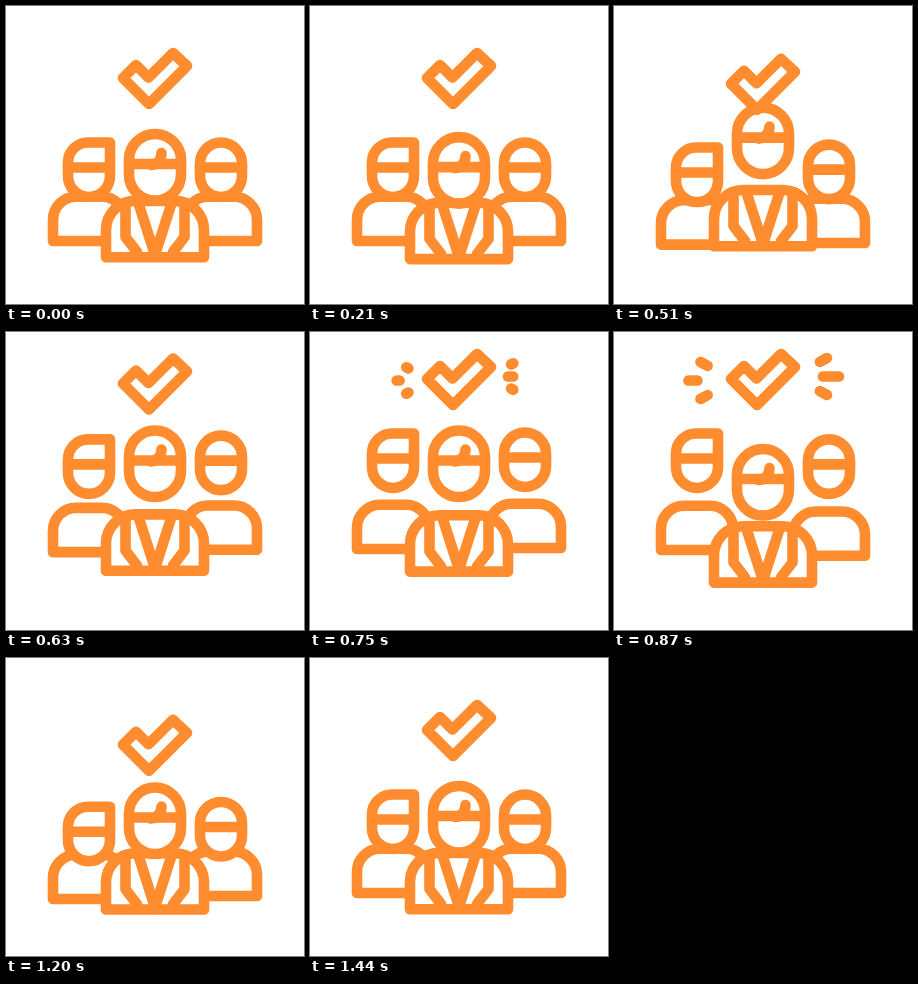
These frames come from a looping animation (298 by 298 pixels, 1680 ms). An HTML page with a canvas:

```html
<!DOCTYPE html>
<html lang="en">
<head>
<meta charset="utf-8">
<title>Approved team</title>
<style>
html, body { margin: 0; width: 100%; height: 100%; overflow: hidden; background: #fff; }
canvas { display: block; width: 298px; height: 298px; }
</style>
</head>
<body>
<canvas id="stage"></canvas>
<script>
const SIZE = 298, LOOP = 1680, STEP = 30;
const ORANGE = '#ff8c2e', WEIGHT = 10.6;
const SQUAT_TIME = 140, RISE_TIME = 230, FALL_TIME = 260;
const HEAD_LAG = 30, HEAD_SWING = 1.65, HEAD_LIFT = 17;
const canvas = document.getElementById('stage');
const ctx = canvas.getContext('2d');
const ratio = window.devicePixelRatio || 1;
canvas.width = canvas.height = Math.round(SIZE * ratio);

const left = { start: 310, fall: 840, squat: 8, lift: 18, dip: 9 };
const right = { start: 295, fall: 780, squat: 9, lift: 19, dip: 9 };
const middle = { start: 175, fall: 715, squat: 12, lift: 12.5, dip: 6 };
const tick = { start: 310, fall: 870, squat: 12, lift: 25, dip: 18 };

function ease(from, duration, t) {
  const u = Math.min(1, Math.max(0, (t - from) / duration));
  return u * u * (3 - 2 * u);
}

// Squat, jump, hang, land below the rest height, then settle.
function hop({ start, fall, squat, lift, dip }, t) {
  return squat * ease(start, SQUAT_TIME, t)
    - (squat + lift) * ease(start + SQUAT_TIME, RISE_TIME, t)
    + (lift + dip) * ease(fall, FALL_TIME, t)
    - dip * ease(fall + FALL_TIME, FALL_TIME, t);
}

// The head follows its body later and swings further.
function headOf({ start, fall, squat, lift, dip }) {
  return {
    start,
    fall: fall + HEAD_LAG,
    squat: squat * HEAD_SWING,
    lift: lift + HEAD_LIFT,
    dip: dip * HEAD_SWING
  };
}

function line(...points) {
  ctx.beginPath();
  for (let i = 0; i < points.length; i += 2) ctx.lineTo(points[i], points[i + 1]);
  ctx.stroke();
}

function box(x, y, w, h, radii) {
  ctx.beginPath();
  ctx.roundRect(x, y, w, h, radii);
  ctx.fill();
  ctx.stroke();
}

function shifted(dy, draw) {
  ctx.save();
  ctx.translate(0, dy);
  draw();
  ctx.restore();
}

function person(motion, t, body, head) {
  shifted(hop(motion, t), body);
  shifted(hop(headOf(motion), t), head);
}

function sideBody(x) {
  box(x, 190.7, 72, 44.3, [23, 23, 0, 0]);
}

function sideHead(x, y, radii) {
  box(x, y, 42, 54.5, radii);
  line(x, y + 25, x + 42, y + 25);
}

function middleBody() {
  box(100, 194.9, 98, 56.3, [29, 29, 0, 0]);
  for (const side of [-1, 1]) {
    line(149 + side * 29.5, 199, 149 + side * 29.5, 231, 149 + side * 18, 246);
    line(149 + side * 16, 199, 149, 249);
  }
}

function middleHead() {
  box(123, 128, 52, 66.5, 26);
  line(123, 158, 175, 158);
  ctx.beginPath();
  ctx.moveTo(145, 159);
  ctx.quadraticCurveTo(155, 158, 155.5, 147);
  ctx.stroke();
}

function checkMark() {
  line(117, 72, 130, 59, 142.5, 71.5, 167, 47, 181, 60, 143, 98, 117, 72, 130, 59);
}

// Three rays fan out on one side; each grows outward, then its tail catches up.
function rays(side, x, y, reach, t) {
  const tip = ease(715, 125, t), tail = ease(800, 160, t);
  if (tip <= tail) return;
  for (const row of [-1, 0, 1]) {
    const dx = side * (row ? 12 : reach), dy = row * 6.5;
    const endX = x + (row ? 0 : side * 12), endY = y + row * 18.5;
    line(endX - dx * (1 - tail), endY - dy * (1 - tail),
      endX - dx * (1 - tip), endY - dy * (1 - tip));
  }
}

function render(t) {
  ctx.setTransform(canvas.width / SIZE, 0, 0, canvas.height / SIZE, 0, 0);
  ctx.fillStyle = '#fff';
  ctx.fillRect(0, 0, SIZE, SIZE);
  ctx.strokeStyle = ORANGE;
  ctx.lineWidth = WEIGHT;
  ctx.lineCap = ctx.lineJoin = 'round';

  person(left, t, () => sideBody(47), () => sideHead(62, 136.5, [20, 0, 21, 21]));
  person(right, t, () => sideBody(179), () => sideHead(194, 136.5, 21));
  person(middle, t, middleBody, middleHead);
  shifted(hop(tick, t), checkMark);
  rays(-1, 86.5, 48.5, 15, t);
  rays(1, 213, 44.5, 27, t);
}

const begin = performance.now();
function frame() {
  const t = (performance.now() - begin) % LOOP;
  render(Math.floor(t / STEP) * STEP);
  requestAnimationFrame(frame);
}
frame();
</script>
</body>
</html>
```
